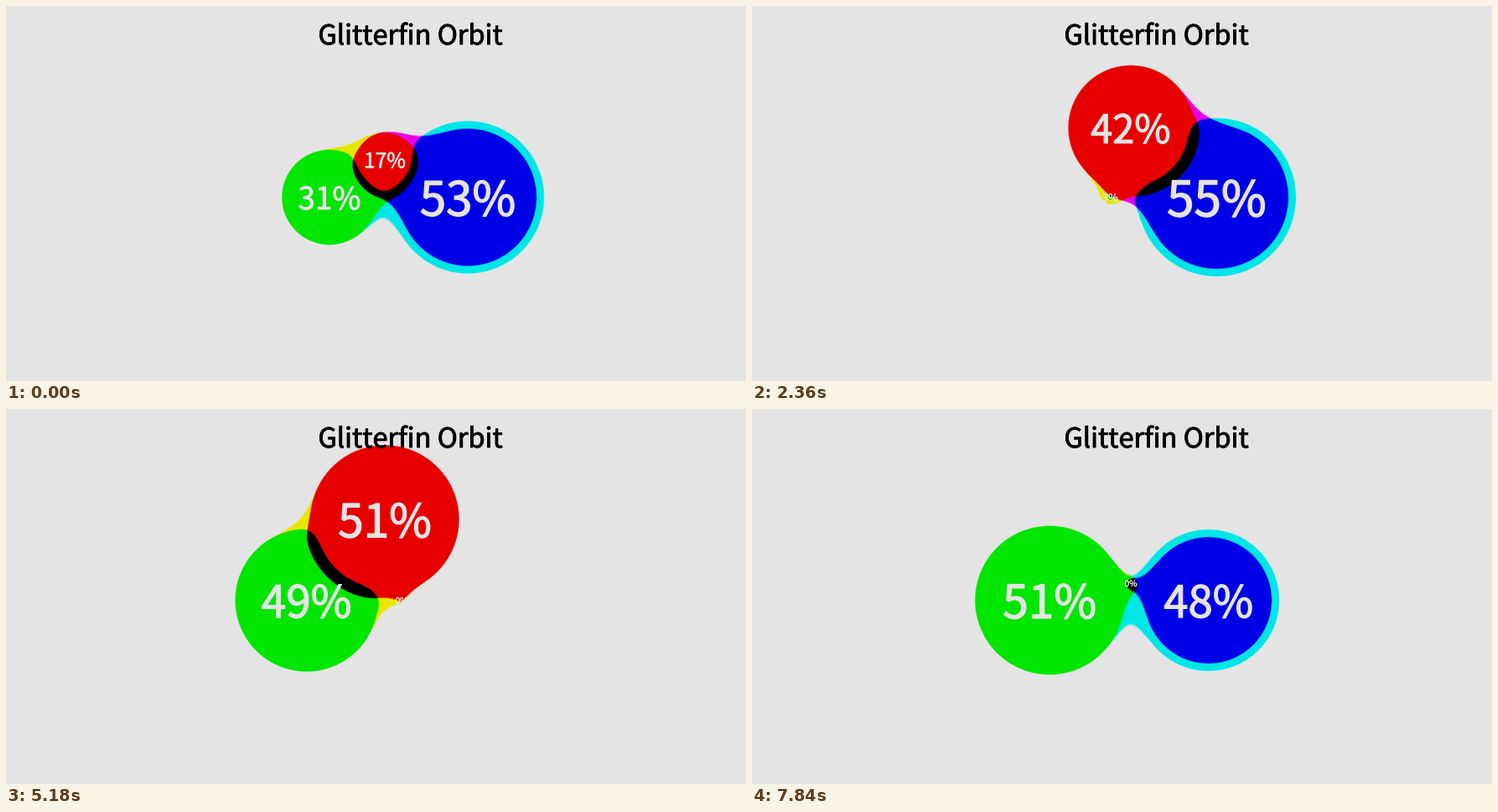
A matplotlib script for the animation above (7.99 s loop, 883 by 448 pixels).

```python
from functools import lru_cache

import numpy as np
import matplotlib.pyplot as plt
from matplotlib import patheffects
from matplotlib.animation import FuncAnimation

W, H, DPI = 883, 448, 100
FRAMES, INTERVAL, STEP = 170, 47, 148   # the shares advance once per STEP ms
CX, CY, GAP = 452, 228.5, 20
GREY = 228
FONT = "Noto Sans CJK JP"

# percentages every 8 steps; values below zero show as zero, blue is the rest
RED = [16.6, -14, 42, 63.6, 57, 38, 11, -5.4]
GREEN = [30.7, 15.8, 3, 26, 42.6, 58, 64.1, 41.6]

yy, xx = np.mgrid[0:H, 0:W] + 0.5


def spline(y, t):
    """Cubic Hermite curve through evenly spaced values."""
    m = np.gradient(y)
    i = min(int(t), len(y) - 2)
    s = t - i
    ease = s * s * (3 - 2 * s)
    return (y[i] + (y[i + 1] - y[i]) * ease
            + s * (1 - s) * ((1 - s) * m[i] - s * m[i + 1]))


def shares(step):
    red, green = (max(spline(y, step / 8), 0) for y in (RED, GREEN))
    return red, green, max(100 - red - green, 0)


def smin(a, b, k):
    h = np.clip(1 - np.abs(a - b) / k, 0, 1)
    return np.minimum(a, b) - h * h * k / 4


def smax(a, b, k):
    return -smin(-a, -b, k)


def swell(r):
    """How far the gooey skin lies outside a disc of radius r."""
    return 12.2 - 20 * np.exp(-r / 18)


def bulge(d):
    """Extra skin where the third disc is close."""
    return 8.5 / (1 + np.exp((d - 12) / 8))


def layout(parts):
    """Centre and radius of the red, green and blue discs."""
    r, g, b = (1.5 * p for p in parts)
    return [(CX, CY - GAP - r, r), (CX - GAP - g, CY, g), (CX + GAP + b, CY, b)]


@lru_cache(maxsize=None)
def picture(step):
    discs = layout(shares(step))
    dist = [np.hypot(xx - x, yy - y) - r for x, y, r in discs]
    red, green, blue = (d - swell(c[2]) for d, c in zip(dist, discs))
    hole = 6 - 24 * np.exp(-discs[0][2] / 6) - dist[0]
    cyan = smax(smin(green, blue, 50), hole, 20)
    magenta = smin(red, blue + 9, 58) - bulge(dist[1])
    yellow = smin(red, green, 50) - bulge(dist[2])
    ink = np.stack([cyan, magenta, yellow], axis=-1)
    cover = np.clip(0.5 - ink / 1.3, 0, 1)
    light = GREY + 2 * cover.max(axis=-1, keepdims=True)
    return np.round(light * (1 - cover)).astype(np.uint8)


def px(size):
    return size * 72 / DPI


def outline(width, color):
    return [patheffects.withStroke(linewidth=px(width), foreground=color)]


fig = plt.figure(figsize=(W / DPI, H / DPI), dpi=DPI)
ax = fig.add_axes([0, 0, 1, 1])
ax.axis("off")
image = ax.imshow(np.full((H, W, 3), GREY, np.uint8), extent=(0, W, H, 0),
                  interpolation="nearest", aspect="auto")
ax.set(xlim=(0, W), ylim=(H, 0))

pale = (GREY / 255,) * 3
labels = [ax.text(0, 0, "", family=FONT, color=pale,
                  ha="center", va="baseline") for _ in range(3)]
ax.text(482.5, 46, "Glitterfin Orbit", family=FONT, fontsize=px(32.5),
        color="black", ha="center", va="baseline",
        path_effects=outline(0.8, "black"))


def update(n):
    # a step that falls within this frame already counts
    step = (n + 1) * INTERVAL // STEP
    parts = shares(step)
    image.set_data(picture(step))
    for label, part, (x, y, _) in zip(labels, parts, layout(parts)):
        size = 10 + 0.88 * part
        label.set_text(f"{part:.0f}%")
        label.set_fontsize(px(size))
        label.set_position((x, y + 0.39 * size))
        label.set_path_effects(outline(0.024 * size, pale))
    return [image, *labels]


anim = FuncAnimation(fig, update, frames=FRAMES, interval=INTERVAL,
                     repeat=True, repeat_delay=0, blit=False)
plt.show()
```
